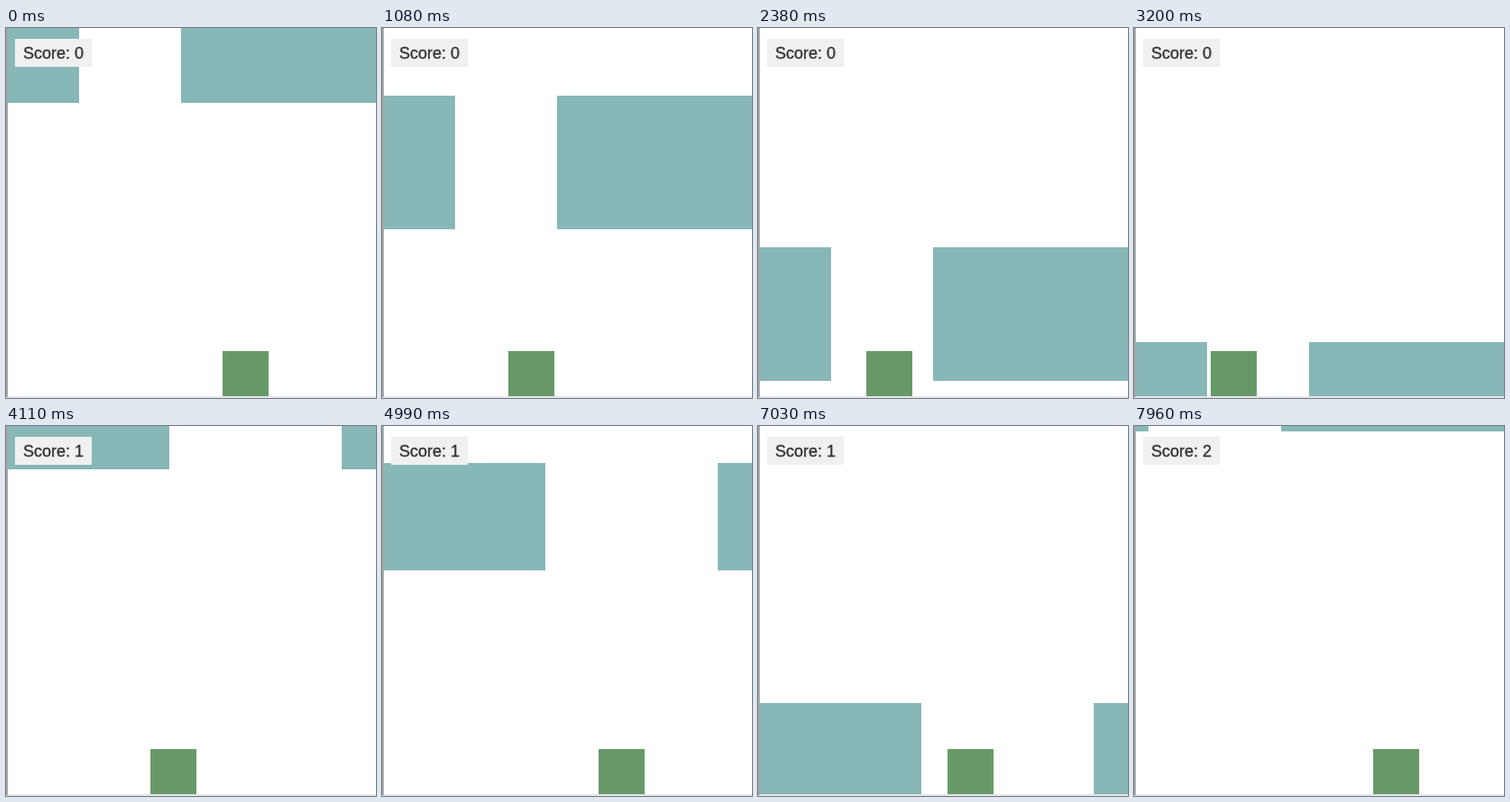
An HTML page with a canvas that plays this animation: 410x410 px, repeating every 7990 ms.

```html
<!DOCTYPE html>
<html lang="en">
<head>
<meta charset="utf-8">
<title>Dodge the walls</title>
<style>
  html, body { margin: 0; width: 100%; height: 100%; overflow: hidden; background: #fff; }
  canvas { display: block; }
</style>
</head>
<body>
<canvas id="stage" width="410" height="410"></canvas>
<script>
const ctx = document.getElementById('stage').getContext('2d');
const LOOP = 7990, TICK = 54;
const SIZE = 410, FLOOR = 408;
const WALL_SPEED = 7, PLAYER_SPEED = 5;

// Each wall starts just above the stage at its spawn tick.
const walls = [
  { spawn: -12, height: 148, gap: [81, 194] },
  { spawn: 69, height: 119, gap: [181, 372] },
  { spawn: 146, height: 130, gap: [16, 163] }
];

// The player never rests: it runs from one turning point to the next.
const turns = [240, 70, 140, 80, 265, 185, 240, 195, 300];

function playerX(tick) {
  let left = tick * PLAYER_SPEED;
  let x = turns[0];
  for (const turn of turns) {
    const step = Math.min(left, Math.abs(turn - x));
    x += step * Math.sign(turn - x);
    left -= step;
  }
  return x;
}

function rect(color, x, y, width, height) {
  ctx.fillStyle = color;
  ctx.fillRect(x, y, width, height);
}

function drawWall({ spawn, height, gap: [left, right] }, tick) {
  const top = WALL_SPEED * (tick - spawn) - 1 - height;
  rect('#88b7b7', 0, top, left, height);
  rect('#88b7b7', right, top, SIZE - right, height);
}

function drawScore(score) {
  const text = 'Score: ' + score;
  rect('#f0f0f0', 10, 12, 85, 31);
  ctx.font = '18px "Liberation Sans", Arial, sans-serif';
  ctx.fillStyle = ctx.strokeStyle = '#333';
  ctx.lineWidth = 0.35;
  ctx.fillText(text, 19, 34);
  ctx.strokeText(text, 19, 34);
}

function draw(time) {
  const tick = Math.round(time / TICK);
  const spawned = walls.filter(wall => tick >= wall.spawn);

  rect('#fff', 0, 0, SIZE, SIZE);
  spawned.forEach(wall => drawWall(wall, tick));
  rect('#679968', playerX(tick), 358, 51, 50);

  rect('#e6e6e6', 0, FLOOR, SIZE, 2);
  rect('#a5a5a5', 0, 0, 2, 409);
  drawScore(spawned.length - 1);
}

function frame() {
  draw(performance.now() % LOOP);
  requestAnimationFrame(frame);
}
frame();
</script>
</body>
</html>
```
